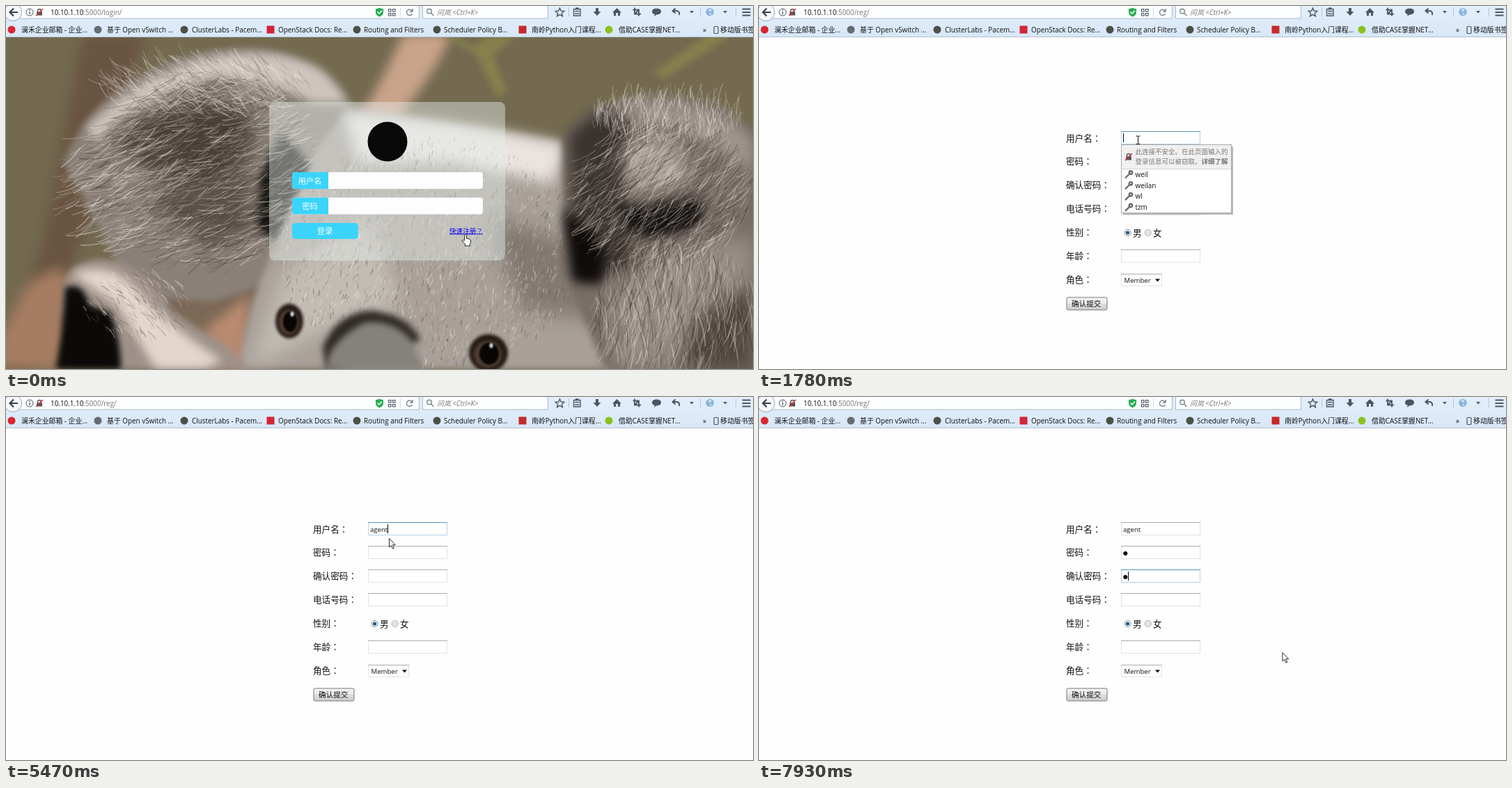
An HTML page with a canvas for the animation above (8000 ms loop, 1073 by 522 pixels).

```html
<!DOCTYPE html>
<html lang="zh-CN">
<head>
<meta charset="utf-8">
<title>注册</title>
<style>
  html, body { margin: 0; width: 100%; height: 100%; overflow: hidden; background: #fefefe; }
  canvas, svg { position: absolute; left: 0; top: 0; width: 1073px; height: 522px; }
  text { font: 9.9px "Open Sans", "Noto Sans CJK SC", "Noto Sans CJK", sans-serif; fill: #111; white-space: pre; }
  .label { font-size: 12.6px; }
  .value { font-size: 9.6px; }
  .dots { font: 8px "DejaVu Sans", sans-serif; }
  .note { font-size: 9.5px; fill: #777; }
  .tag { font-size: 11.3px; fill: #fff; text-anchor: middle; }
  .link { font-size: 9.6px; fill: #00e; text-decoration: underline; }
  .centred { font-family: "Noto Sans CJK TC", "Noto Sans CJK", sans-serif; }
  .line { fill: none; stroke: #4b5661; stroke-width: 1.4; }
  .solid { fill: #4b5661; }
  .field rect { fill: #fff; stroke: #e0e2e8; }
  .field path { stroke: #a9abb2; }
  .field.on rect { stroke: #b3d3ea; }
  .field.on path { stroke: #5794bf; }
</style>
</head>
<body>
<canvas id="photo" width="1073" height="522"></canvas>
<svg viewBox="0 0 1073 522">
  <defs>
    <linearGradient id="bar" x2="0" y2="1"><stop stop-color="#e3effb"/><stop offset="1" stop-color="#d8e7f7"/></linearGradient>
    <linearGradient id="push" x2="0" y2="1"><stop stop-color="#f4f4f4"/><stop offset=".5" stop-color="#e9e9e9"/><stop offset=".5" stop-color="#dcdcdc"/><stop offset="1" stop-color="#cfcfcf"/></linearGradient>
    <g id="key" stroke="#666" fill="none"><circle cx="3" cy="-3" r="2.2" stroke-width="2.4"/><path d="M1 -1L-5 5" stroke-width="2.2"/></g>
    <g id="lock"><path d="M-2.5 0v-2a2.5 2.5 0 0 1 5 0v2" fill="none" stroke="#555" stroke-width="1.4"/><path d="M-4 -.5h8v5h-8z" fill="#555"/><path d="M-5 5L5 -5" stroke="#d92c2c" stroke-width="1.5"/></g>
  </defs>

  <g id="login">
    <rect x="378" y="138" width="339" height="228" rx="8" fill="#e4eae8" fill-opacity=".45"/>
    <circle cx="548" cy="195" r="28.5" fill="#090909"/>
    <rect x="411" y="239" width="274" height="24" rx="4" fill="#fdfdfd"/>
    <rect x="411" y="275.5" width="274" height="24" rx="4" fill="#fdfdfd"/>
    <path d="M415 239h48v24h-48q-4 0-4-4v-16q0-4 4-4zM415 275.500h48v24h-48q-4 0-4-4v-16q0-4 4-4z" fill="#3ad4fb"/>
    <rect x="411" y="312" width="95" height="23" rx="5" fill="#3ad4fb"/>
    <text class="tag" x="436.500" y="255.500">用户名</text>
    <text class="tag" x="436.500" y="292">密码</text>
    <text class="tag" x="458" y="328">登录</text>
    <text class="link" x="637" y="326.500">快速注册<tspan class="centred" lang="zh-TW">？</tspan></text>
  </g>

  <g id="reg">
    <g id="form"></g>
    <g stroke="#8d9399"><circle cx="529.500" cy="326" r="4.600" fill="#eef3f7"/><circle cx="558.700" cy="326" r="4.600" fill="#e4e4e4" stroke="#b5b5b5"/></g>
    <circle cx="529.500" cy="326" r="2.600" fill="#1f5a87"/>
    <text class="label" x="537" y="330.700">男</text><text class="label" x="566" y="330.700">女</text>
    <g class="field"><rect x="520.500" y="385.500" width="58" height="17"/><path d="M520 385.500h59"/></g>
    <text class="value" x="524.500" y="398">Member</text><path d="M569 392.500h7l-3.500 4z"/>
    <rect x="442" y="419" width="58" height="18" rx="2" fill="url(#push)" stroke="#777"/>
    <text x="449" y="432" style="font-size:10.6px">确认提交</text>
    <text class="value" id="user" x="523" y="193.800"></text>
    <text class="dots" id="pass" x="523" y="227"></text>
    <text class="dots" id="again" x="523" y="261"></text>
    <path id="caret" stroke="#000"/>
    <g id="popup">
      <path id="shade" fill="#000" fill-opacity=".28"/>
      <rect id="panel" x="520.500" y=".5" width="158" fill="#fff" stroke="#aaa"/>
      <path d="M521 1h157v34h-157z" fill="#f0f0f0"/><path d="M521 35.500h157" stroke="#d4d4d4"/>
      <use href="#lock" x="531" y="18"/>
      <text class="note" x="540.500" y="14.300">此连接不安全。在此页面输入的</text>
      <text class="note" x="540.500" y="27.800">登录信息可以被窃取。<tspan font-weight="bold">详细了解</tspan></text>
      <g id="names"></g>
    </g>
  </g>

  <path d="M0 0h1073v45H0z" fill="url(#bar)"/>
  <path d="M0 44.500h1073" stroke="#b3c1d0"/>
  <path d="M10 -1h583.500v19H10zM598.500 -1h180v19h-180z" fill="#fdfeff" stroke="#a9b8c8"/>
  <circle cx="10" cy="9" r="12.500" fill="#f5f9fd" stroke="#96a5b4"/>
  <path d="M17 9H6M11 3.500L5.500 9l5.500 5.500" class="line" style="stroke-width:2.2;stroke:#37424d"/>
  <g class="line" style="stroke-width:1"><circle cx="34" cy="9" r="5"/><path d="M34 8v4M34 5.500v1.500" stroke-width="1.300"/></g>
  <use href="#lock" x="48" y="9"/>
  <text x="64" y="12.800">10.10.1.10<tspan id="path" fill="#777"></tspan></text>
  <path d="M531 4q3 0 5.500-1.500Q539 4 542 4v5q0 4-5.500 6.500Q531 13 531 9z" fill="#27ac55"/>
  <path d="M533.500 8.500l2.500 2.500 4-4.500" fill="none" stroke="#fff" stroke-width="1.500"/>
  <path d="M549.500 4.500h3.500v3.500h-3.500zM555.500 4.500h3.500v3.500h-3.500zM549.500 10.500h3.500v3.500h-3.500zM555.500 10.500h3.500v3.500h-3.500z" class="line" style="stroke-width:1.2"/>
  <path d="M566.500 2v14" stroke="#d5dce3"/>
  <path id="reload" d="M583.500 7.500a4.200 4.200 0 1 0 0 3.500M584 4v4h-4" class="line" style="stroke:#75808a"/>
  <path id="stop" d="M576 5.500l7 7M583 5.500l-7 7" class="line" style="stroke:#75808a"/>
  <g class="line" style="stroke:#7a858f"><circle cx="608" cy="7.500" r="3.300"/><path d="M610.500 10l4 4"/></g>
  <text x="619" y="12.800" style="fill:#777;font-style:italic">问岚 &lt;Ctrl+K&gt;</text>
  <path d="M795.500 3l1.800 4 4.400.4-3.300 3 1 4.300-3.900-2.300-3.900 2.300 1-4.300-3.300-3 4.400-.4z" class="line"/>
  <path d="M808.500 2v13M997.500 2v13M1048.500 2v13" stroke="#bac7d4"/>
  <path d="M815.500 4.500h9.500v9.500h-9.500zM817 7.500h6.500M817 11h6.500M818 3h4.500" class="line"/>
  <path d="M847 3h4v5h3.500L849 14l-5.500-6h3.500zM871 9.500L877.500 3l6.500 6.500h-2V14h-3v-4h-3v4h-3V9.500zM982 7h6l-3 3.500zM1030 7h6l-3 3.500z" class="solid"/>
  <path d="M903 2.500v9h9M900.500 5.500h8.500v9M909 5.500l-6 6M1057.500 4.500h12M1057.500 9h12M1057.500 13.500h12" class="line" style="stroke-width:1.8"/>
  <path d="M932 12l-1.500 3 4-2.500q6.500-.5 6.500-4.500 0-4.500-6.500-4.500t-6.500 4.500q0 3 4 4z" class="solid"/>
  <path d="M961.500 3.500L957.500 7l4 3.500M958 7h6q4 1 3 6" class="line" style="stroke-width:2"/>
  <circle cx="1011" cy="8.500" r="5.800" fill="#8bb4dc"/><path d="M1008 5l4-1.500 2 3-3 2zM1010 10l4 .5-2 3z" fill="#c9ddeb"/>
  <g id="marks"></g>
  <text x="1001" y="38">»</text>
  <rect x="1017" y="29.500" width="6" height="10" rx="1" class="line" style="stroke-width:1.2"/>
  <text x="1026" y="38">移动版书签</text>

  <g id="mouse" fill="#fff" stroke="#111" stroke-linejoin="round">
    <path id="arrow" d="M.5 .5v12.500l2.800-2.600 2 4.800 2-.9-2-4.600h4z" stroke-width=".9"/>
    <path id="hand" d="M-1.500 9V1.500Q0-.5 1.500 1.500V6l5 1.500q1.500.5 1 3.500l-1 3.500V17h-7v-2.500L-4.500 10q0-2.500 3-.5" stroke-width=".9"/>
    <path id="beam" d="M-3-5.500h2.500L0-5 .5-5.500H3M0-5V5.500M-3 6h2.500L0 5.500.5 6H3" fill="none"/>
  </g>
</svg>
<script>
const $ = id => document.getElementById(id);
const show = (id, on) => { $(id).style.display = on ? '' : 'none'; };

const rows = { 用户名: 180, 密码: 214, 确认密码: 248, 电话号码: 282, 性别: 0, 年龄: 350, 角色: 0 };
$('form').innerHTML = Object.entries(rows).map(([name, y], i) =>
  `<text class="label" x="441" y="${194.500 + i * 33.950}">${name}<tspan class="centred" lang="zh-TW">：</tspan></text>` +
  (y ? `<g class="field" id="box${i}"><rect x="520.5" y="${y + .5}" width="113" height="18"/><path d="M520 ${y + .5}h114"/></g>` : '')
).join('');

$('names').innerHTML = ['weil', 'weilan', 'wl', 'tzm'].map((name, i) => {
  const y = 43.500 + i * 15.800;
  return `<use href="#key" x="531" y="${y}"/><text x="540.5" y="${y + 3.300}">${name}</text>`;
}).join('');

const bookmarks = [
  [8, 22, '#d8262c', '澜禾企业邮箱 - 企业...'],
  [132, 145, '#666b70', '基于 Open vSwitch ...'],
  [256, 267, '#4c5046', 'ClusterLabs - Pacem...'],
  [380, 391, '#d32535', 'OpenStack Docs: Re...', 1],
  [504, 514, '#4c5046', 'Routing and Filters'],
  [619, 629, '#4c5046', 'Scheduler Policy B...'],
  [742, 755, '#c52a28', '南岭Python入门课程...', 1],
  [866, 880, '#8cc11f', '借助CASE掌握NET...']
];
$('marks').innerHTML = bookmarks.map(([x, tx, color, title, square]) =>
  `<rect x="${x - 5.500}" y="28.5" width="11" height="11" rx="${square ? 0 : 5.500}" fill="${color}"/><text x="${tx}" y="38">${title}</text>`
).join('');

// Photo backdrop: soft shapes with seeded fur strokes
function paintPhoto() {
  const c = $('photo').getContext('2d');
  let seed = 7;
  const rnd = () => (seed = seed * 16807 % 2147483647) / 2147483647;
  const blob = (color, blur, d) => {
    c.filter = blur ? `blur(${blur}px)` : 'none';
    c.fillStyle = color;
    c.fill(new Path2D(d));
  };
  const oval = (color, blur, x, y, rx, ry) => {
    c.filter = `blur(${blur}px)`;
    c.fillStyle = color;
    c.beginPath();
    c.ellipse(x, y, rx, ry, 0, 0, 7);
    c.fill();
  };
  // Strokes of one direction scattered inside an oval
  const fur = (count, x, y, rx, ry, length, angle, colors) => {
    c.filter = 'none';
    for (let i = 0; i < count; i++) {
      const a = rnd() * 6.283, r = Math.sqrt(rnd());
      const px = x + Math.cos(a) * rx * r, py = y + Math.sin(a) * ry * r;
      const dir = angle + (rnd() - .5) * .8, len = length * (.5 + rnd());
      c.globalAlpha = .2 + rnd() * .3;
      c.strokeStyle = colors[i % colors.length];
      c.lineWidth = .6 + rnd();
      c.beginPath();
      c.moveTo(px, py);
      c.quadraticCurveTo(px + Math.cos(dir) * len * .6, py + Math.sin(dir) * len * .6, px + Math.cos(dir + .15) * len, py + Math.sin(dir + .15) * len);
      c.stroke();
    }
    c.globalAlpha = 1;
  };
  const pale = ['#f4eee8', '#d2c9c1', '#8a8078'];
  const mixed = ['#e6ded7', '#b0a69d', '#3d342e', '#736860'];

  blob('#736a50', 0, 'M0 0H1073V522H0z');
  blob('#695441', 10, 'M110 40H200L150 220 85 400 30 522H0L55 330z');
  blob('#a67d63', 9, 'M30 400L75 375 95 400 80 522H-10V480z');
  blob('#c9a38a', 8, 'M570 40H640Q615 100 560 165H505Q540 110 570 40z');
  blob('#86804c', 5, 'M625 40L675 70 705 130 720 125 700 70 735 40 690 45 672 58 640 40zM1010 40L930 95 945 105 1045 40z');
  blob('#7c6856', 10, 'M190 390H390V522H250z');
  blob('#b98a70', 8, 'M285 465L350 415 345 522H300z');

  blob('#8a8078', 5, 'M82 225Q120 130 215 90 290 50 385 65 460 85 500 148L470 290 375 400 300 425 215 420 160 370 120 295z');
  blob('#cdc5bd', 7, 'M115 175Q200 95 290 75 385 55 450 90 480 115 490 140L440 140Q380 100 290 105 200 130 130 195z');
  blob('#4a413b', 13, 'M150 190Q260 110 350 145L355 205 300 270 235 265z');
  blob('#5b514a', 12, 'M190 280L345 235 360 320 290 350z');
  blob('#151210', 6, 'M365 245L395 180 440 230 390 340 360 320z');
  fur(1800, 300, 230, 165, 140, 26, 2.600, mixed);
  fur(600, 290, 120, 150, 45, 22, 3.700, pale);
  fur(350, 180, 250, 85, 95, 30, 2.500, pale);

  blob('#a8a099', 5, 'M490 150Q620 165 800 195L880 370 870 522H335Q345 430 385 350L450 200z');
  blob('#e9e4df', 10, 'M485 152Q640 162 805 200L785 255 640 225 505 225z');
  blob('#c3bcb5', 14, 'M400 380L520 300 570 430 450 470 350 522z');
  blob('#827971', 14, 'M690 300L850 350 850 450 740 440z');
  fur(2600, 610, 350, 220, 165, 7, 1.700, ['#faf5f0', '#d2cac3', '#5d534c', '#968c84']);

  blob('#786e67', 5, 'M800 190Q835 135 925 133 1030 125 1080 190V522H860L800 380z');
  blob('#3a332e', 10, 'M808 185L850 150 900 165 890 240 905 380 820 395z');
  blob('#b5aca4', 11, 'M885 205L960 190 975 250 900 270z');
  blob('#9d948c', 9, 'M880 138Q1000 125 1073 190V240L1000 190 900 160z');
  blob('#0e0c0b', 8, 'M800 290L860 340 855 400 815 395zM880 290L1000 275 1000 315 930 335 890 325z');
  blob('#988e86', 14, 'M865 420L920 360 1073 330V500L960 522H880z');
  blob('#4e453f', 12, 'M1000 440L1073 400V522H960z');
  fur(1400, 950, 260, 125, 105, 28, 2.200, mixed);
  fur(500, 950, 165, 110, 35, 20, 4.600, pale);
  fur(800, 960, 420, 115, 90, 34, 1.500, mixed);

  blob('#9e9189', 4, 'M85 390Q110 355 165 368 215 390 240 440L325 495 345 522H160Q150 450 80 445z');
  blob('#e3d6cc', 7, 'M95 385Q150 365 190 410 220 450 310 510L285 522H215L160 430z');
  blob('#0c0a09', 4, 'M85 405Q110 395 120 430L150 440Q165 480 165 522H72L80 470z');
  fur(260, 185, 425, 75, 50, 13, .7, ['#eee1d8', '#b5a79e', '#6d6058']);

  blob('#2e2925', 5, 'M455 490Q475 440 525 438 580 445 595 480L575 490 460 522z');
  blob('#85817d', 5, 'M460 522Q460 485 515 455 560 450 585 485L600 522z');
  for (const [x, y, rx, ry] of [[407, 453, 20, 25], [693, 499, 28, 27]]) {
    oval('#241b16', 2, x, y, rx, ry);
    oval('#4f3c31', 2, x - 1, y + 2, rx * .72, ry * .72);
    oval('#080605', 1, x + 1, y + 1, rx * .5, ry * .58);
    oval('#dce1e6', 1, x + 4, y - ry * .4, 2.500, 3.500);
  }
}
paintPhoto();

// Each step changes part of the running state
const steps = [
  [0, { page: 'login', busy: 0, mouse: ['hand', 660, 328], focus: -1, caret: 0, popup: 0, user: '', pass: '', again: '' }],
  [270, { busy: 1 }],
  [510, { page: 'reg', busy: 0, mouse: ['arrow', 627.500, 310.500] }],
  [630, { mouse: ['arrow', 615, 292] }],
  [780, { mouse: ['arrow', 592, 257] }],
  [930, { mouse: ['arrow', 567, 223] }],
  [1080, { mouse: ['arrow', 551, 203] }],
  [1230, { mouse: ['beam', 546, 195] }],
  [1380, { mouse: ['beam', 544.500, 192.500] }],
  [1530, { focus: 0, caret: 1 }],
  [1780, { popup: 199 }],
  [2150, { caret: 0 }],
  [2610, { caret: 1 }],
  [3170, { caret: 0 }],
  [3600, { caret: 1 }],
  [4280, { user: 'a' }],
  [4430, { user: 'ag', popup: 0 }],
  [4600, { user: 'age' }],
  [4780, { user: 'agen' }],
  [4950, { user: 'agent' }],
  [5350, { mouse: ['arrow', 550, 203] }],
  [5480, { mouse: ['beam', 557.500, 224] }],
  [5620, { focus: 1, popup: 233 }],
  [5760, { mouse: ['arrow', 590, 244] }],
  [5900, { mouse: ['arrow', 640, 272] }],
  [6040, { mouse: ['arrow', 682, 294] }],
  [6180, { mouse: ['arrow', 700, 303] }],
  [6310, { popup: 0 }],
  [6430, { mouse: ['arrow', 630, 270] }],
  [6590, { mouse: ['beam', 557.500, 224] }],
  [6710, { pass: '●' }],
  [6850, { mouse: ['arrow', 557, 238] }],
  [6990, { mouse: ['beam', 557.500, 258] }],
  [7110, { focus: 2, popup: 267 }],
  [7250, { mouse: ['arrow', 640, 294] }],
  [7390, { mouse: ['arrow', 702, 319] }],
  [7540, { again: '●', popup: 0 }],
  [7670, { mouse: ['arrow', 722, 338] }],
  [7800, { mouse: ['arrow', 742, 358] }],
  [7930, { mouse: ['arrow', 751.500, 367] }]
];
const inputs = ['user', 'pass', 'again'];
let current = -1;

function render(count) {
  const s = Object.assign({}, ...steps.slice(0, count).map(step => step[1]));
  for (const page of ['login', 'reg']) show(page, s.page === page);
  show('photo', s.page === 'login');
  show('stop', s.busy);
  show('reload', !s.busy);
  $('path').textContent = `:5000/${s.page}/`;
  inputs.forEach((id, i) => {
    $(id).textContent = s[id];
    $('box' + i).classList.toggle('on', s.focus === i);
  });

  show('caret', s.caret);
  if (s.caret) {
    const width = s[inputs[s.focus]] ? $(inputs[s.focus]).getComputedTextLength() : 0;
    $('caret').setAttribute('d', `M${Math.round(523 + width) + .5} ${183 + s.focus * 34}v13`);
  }

  show('popup', s.popup);
  const full = s.focus === 0, height = full ? 99 : 35;
  show('names', full);
  $('panel').setAttribute('height', height - 1);
  $('shade').setAttribute('d', `M523 ${height}h156V3h2v${height - 1}H523z`);
  $('popup').setAttribute('transform', `translate(0 ${s.popup})`);

  const [kind, x, y] = s.mouse;
  for (const id of ['arrow', 'hand', 'beam']) show(id, id === kind);
  $('mouse').setAttribute('transform', `translate(${x} ${y})`);
}

function tick() {
  const now = performance.now() % 8000;
  const count = steps.filter(step => step[0] <= now).length;
  if (count !== current) render(current = count);
  requestAnimationFrame(tick);
}
tick();
</script>
</body>
</html>
```
